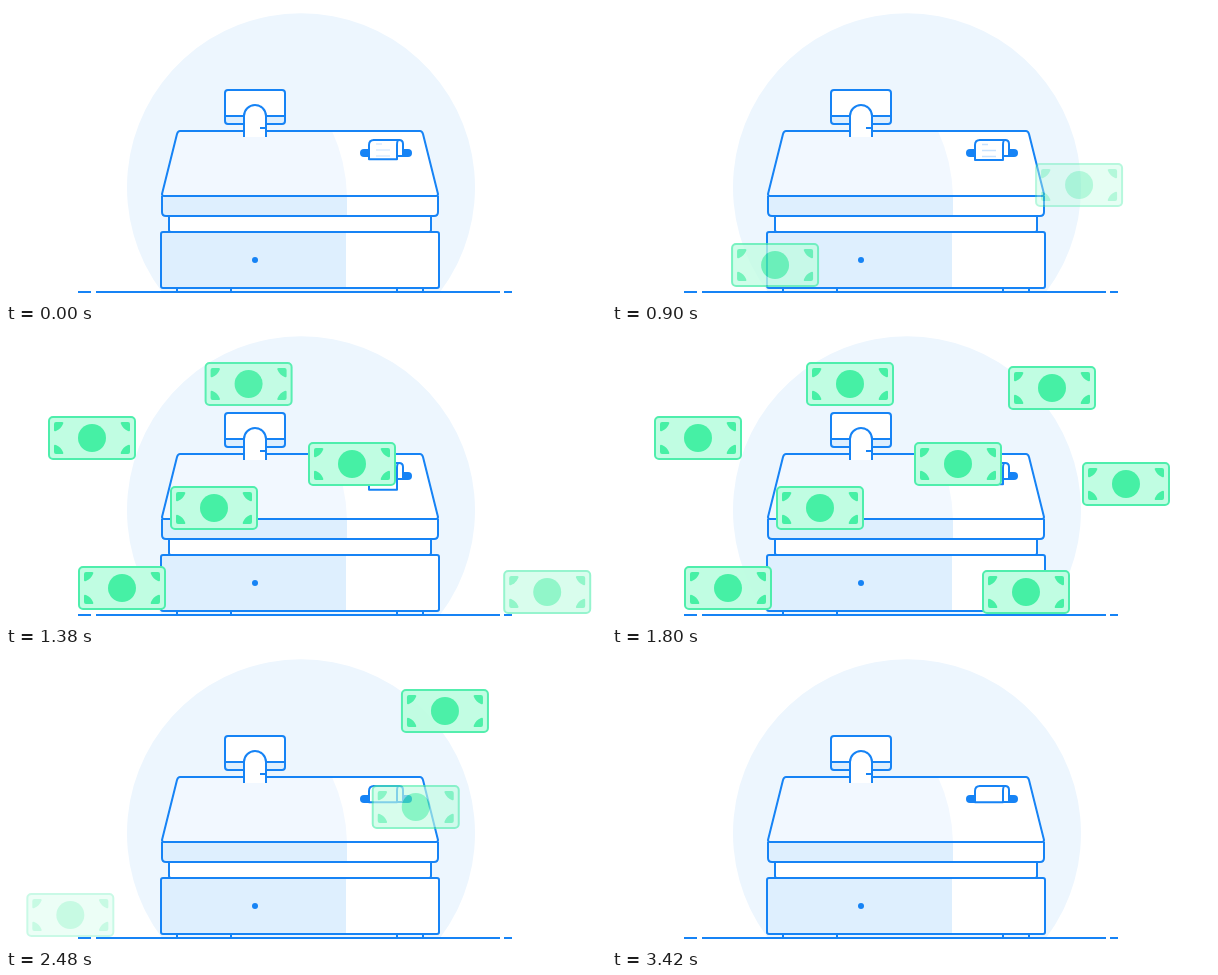
An HTML page for the animation above (3.52 s loop, 600x295 px).

```html
<!DOCTYPE html>
<html lang="en">
<head>
<meta charset="utf-8">
<title>Cash register</title>
<style>
html, body { margin: 0; width: 100%; height: 100%; overflow: hidden; background: #fff; }
svg { display: block; width: 600px; height: 295px; }
.line { stroke: #1683f5; stroke-width: 2; fill: none; stroke-linejoin: round; }
.white { fill: #fff; }
.pale { fill: #f2f8ff; }
.shade { fill: #deeffe; }
.blue { fill: #1683f5; }
.note { fill: #c0fde2; stroke: #4eeeac; stroke-width: 2; }
.ink { fill: #46f0a5; }
</style>
</head>
<body>
<svg viewBox="0 0 600 295">
  <defs>
    <path id="corner" class="ink" d="M6 8q0-2 2-2h6q2 0 1 2q-2 5-7 7q-2 1-2-1z"/>
    <g id="bill">
      <rect class="note" x="1" y="1" width="86" height="42" rx="4"/>
      <circle class="ink" cx="44" cy="22" r="14"/>
      <use href="#corner"/>
      <use href="#corner" transform="matrix(-1 0 0 1 88 0)"/>
      <use href="#corner" transform="matrix(1 0 0 -1 0 44)"/>
      <use href="#corner" transform="matrix(-1 0 0 -1 88 44)"/>
    </g>
  </defs>

  <path fill="#edf6fe" d="M156 286A174 174 0 1 1 434 286z"/>
  <path class="line" d="M72 286H85M90 286H494M498 286H506M171 282V286M225 282V286M391 282V286M417 282V286"/>

  <!-- drawer and body -->
  <rect class="white" x="155" y="226" width="278" height="56" rx="2"/>
  <path class="shade" d="M155 226H340V282H155z"/>
  <rect class="line" x="155" y="226" width="278" height="56" rx="2"/>
  <circle class="blue" cx="249" cy="254" r="3"/>
  <rect class="line white" x="163" y="209" width="262" height="17" rx="2"/>
  <path class="white" d="M156 190H432V206q0 4-4 4H160q-4 0-4-4z"/>
  <path class="shade" d="M156 190H341V210H160q-4 0-4-4z"/>
  <path class="line" d="M156 190V206q0 4 4 4H428q4 0 4-4V190"/>
  <path class="white" d="M174 125H414q2 0 3 3L432 190H156L171 128q1-3 3-3z"/>
  <path class="pale" d="M174 125H326Q340 155 341 190H156L171 128q1-3 3-3z"/>
  <path class="line" d="M174 125H414q2 0 3 3L432 188q0 2-2 2H158q-2 0-2-2L171 128q1-3 3-3z"/>

  <!-- display -->
  <rect class="white" x="219" y="84" width="60" height="34" rx="3"/>
  <path class="shade" d="M219 110H279V115q0 3-3 3H222q-3 0-3-3z"/>
  <rect class="line" x="219" y="84" width="60" height="34" rx="3"/>
  <path class="line" d="M219 110H279"/>
  <path class="white" d="M238 131V110a11 11 0 0 1 22 0V131z"/>
  <path class="line" d="M238 131V110a11 11 0 0 1 22 0V131M254 122H260"/>

  <!-- receipt -->
  <rect class="blue" x="354" y="143" width="52" height="8" rx="4"/>
  <path class="line white" d="M368 134H393q4 0 4 4V150H391V139z"/>
  <path class="line white" id="paper"/>
  <path class="line" id="print" d="M370 0H376M370 6H384M370 12H384" style="stroke-width:1.6"/>

  <g id="bills"></g>
</svg>
<script>
const LOOP = 3520, SLIDE = 300, TRAVEL = 635;
// x, y, time of arrival, time of departure
const bills = [
  [72, 237, 975, 1800],
  [164, 157, 1080, 1880],
  [42, 87, 1204, 1970],
  [302, 113, 1304, 2070],
  [194, 33, 1404, 2170],
  [370, 241, 1504, 2270],
  [470, 133, 1604, 2370],
  [396, 37, 1704, 2470]
].map(([x, y, arrive, leave]) => {
  const el = document.createElementNS("http://www.w3.org/2000/svg", "use");
  el.setAttribute("href", "#bill");
  document.getElementById("bills").append(el);
  return { el, x, y, arrive, leave };
});
const paper = document.getElementById("paper");
const print = document.getElementById("print");

const clamp = v => Math.min(1, Math.max(0, v));
const easeIn = u => 1 - Math.cos(u * Math.PI / 2);

function draw(t) {
  const out = (1 - Math.cos(2 * Math.PI * (t / 880 + 0.14))) / 2;
  paper.setAttribute("d", `M363 ${150 + 17 * out}V139q0-5 5-5H393q-2 0-2 5V${150 + 17 * out}z`);
  print.setAttribute("transform", `translate(0 ${136.5 + 8 * out})`);
  print.setAttribute("opacity", clamp(out * 1.15 - 0.05));

  for (const { el, x, y, arrive, leave } of bills) {
    const before = clamp((arrive - t) / SLIDE);
    const after = clamp((t - leave) / SLIDE);
    const dx = TRAVEL * (easeIn(before) - easeIn(after));
    el.setAttribute("transform", `translate(${x + dx} ${y})`);
    el.setAttribute("opacity", 1 - before - after);
  }
}

function tick() {
  draw(performance.now() % LOOP);
  requestAnimationFrame(tick);
}
tick();
</script>
</body>
</html>
```
